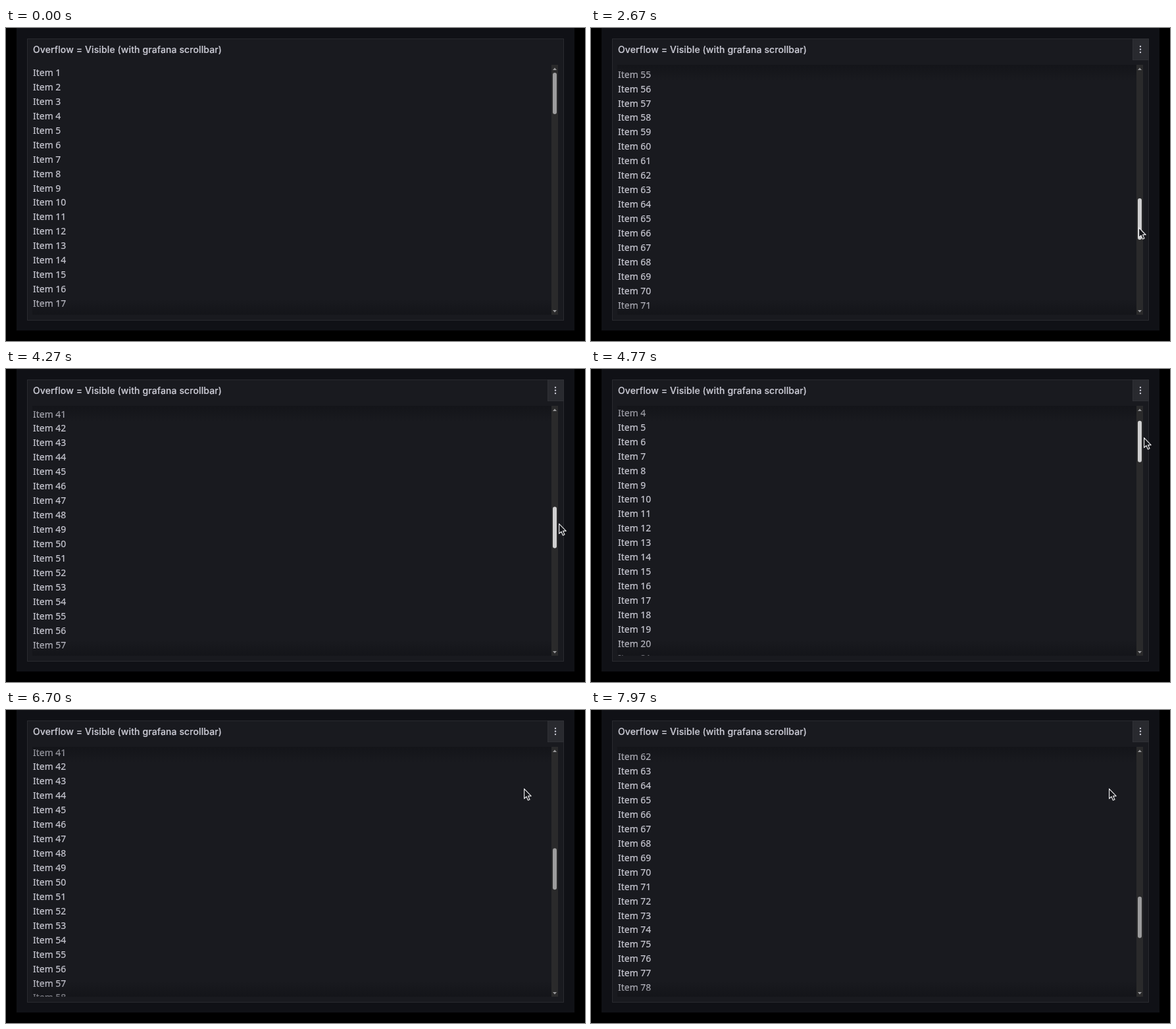
An HTML page that plays this animation: 880x476 px, repeating every 8000 ms.

```html
<!DOCTYPE html>
<html lang="en">
<head>
<meta charset="utf-8">
<title>Scrolling panel</title>
<style>
html, body { margin: 0; width: 100%; height: 100%; overflow: hidden; background: #000; }
#stage { position: relative; width: 880px; height: 476px; overflow: hidden; }
#stage div, #stage svg { position: absolute; box-sizing: border-box; }
#page { left: 16px; top: 0; width: 848px; height: 460px; background: #101116; }
#panel { left: 32px; top: 16px; width: 816px; height: 429px; background: #191a1f; border: 1px solid #292a2f; }
#title, #list { color: #c9c9d3; white-space: nowrap; -webkit-text-stroke: .2px #c9c9d3; }
#title { left: 41px; top: 21.5px; font: 500 13.96px/22px Inter, sans-serif; letter-spacing: .13px; }
#menu { left: 823px; top: 16px; width: 25px; height: 33px; background: #292a2f; border: 1px solid #2f3035; }
#view { left: 40px; top: 56px; width: 790px; height: 380px; overflow: hidden; }
#list { left: 1px; top: 1px; font: 13.96px/21.94px "Noto Sans", sans-serif; }
#list p { margin: 0; height: 21.94px; }
.shade { left: 0; width: 100%; height: 24px; }
#above { top: 0; background: linear-gradient(#0d0e1270, #0d0e1200); }
#below { bottom: 0; background: linear-gradient(#0d0e1200, #0d0e1270); }
#track { left: 829px; top: 56px; width: 10px; height: 380px; background: #2a2a2b; }
#thumb { left: 831px; top: 67.5px; width: 6px; height: 63px; border-radius: 3px; }
#deco, #cursor { left: 0; top: 0; overflow: visible; }
</style>
</head>
<body>
<div id="stage">
  <div id="page"></div>
  <div id="panel"></div>
  <div id="title">Overflow = Visible (with grafana scrollbar)</div>
  <div id="menu"></div>
  <div id="view">
    <div id="list"></div>
    <div id="above" class="shade"></div>
    <div id="below" class="shade"></div>
  </div>
  <div id="track"></div>
  <div id="thumb"></div>
  <svg id="deco" width="880" height="476">
    <path d="M831 64l3-3.5 3 3.5zM831 429l3 3.5 3-3.5z" fill="#98989a"/>
    <g id="dots" fill="#c9c9d3">
      <circle cx="835" cy="28" r="1.2"/><circle cx="835" cy="32.5" r="1.2"/><circle cx="835" cy="37" r="1.2"/>
    </g>
  </svg>
  <svg id="cursor" width="14" height="20">
    <path d="M.6 .8V15.8L4 12.7L6.4 18.3L9 17.2L6.6 11.8H11.2Z" fill="#15161a" stroke="#e4e4e6" stroke-width="1.2" stroke-linejoin="round"/>
  </svg>
</div>
<script>
const LOOP = 8000, MAX = 1814, THUMB_RATIO = 6.19;
// when each action begins, in ms
const ENTER = 830, DRAG_DOWN = 1640, REGRIP = 3000, DRAG_UP = 3587, RELEASE = 5400, WHEEL = 5930;

const $ = id => document.getElementById(id);
const clamp = v => Math.min(1, Math.max(0, v));
const part = (t, from, length) => clamp((t - from) / length);
const smooth = p => p * p * (3 - 2 * p);
const mix = (a, b, p) => a + (b - a) * p;

for (let n = 1; n <= 100; n++) {
  const row = document.createElement("p");
  row.textContent = "Item " + n;
  $("list").append(row);
}

function scrollAt(t) {
  if (t < DRAG_UP) return MAX * part(t, DRAG_DOWN, 1225) ** 2.486;
  if (t < WHEEL) return MAX * (1 - smooth(part(t, DRAG_UP, 1338)));
  return 1335 * (1 - (1 - part(t, WHEEL, 2040)) ** 2.27);
}

function pointerAt(t, thumb) {
  if (t < DRAG_DOWN) {
    const p = smooth(part(t, ENTER, 800));
    return [mix(88, 832, p), mix(449, 107, p)];
  }
  if (t < REGRIP) return [832, 107 + thumb * 1.025];
  if (t < DRAG_UP) {
    const p = smooth(part(t, REGRIP, 400));
    return [mix(832, 840, p), mix(407, 93 + thumb, p)];
  }
  if (t < RELEASE) return [840, 93 + thumb];
  const p = smooth(part(t, RELEASE, 300));
  return [mix(840, 787, p), mix(93, 119, p) + 65 * Math.sin(Math.PI * p)];
}

function draw(t) {
  const scroll = scrollAt(t), thumb = scroll / THUMB_RATIO;
  const [x, y] = pointerAt(t, thumb);
  $("list").style.transform = `translateY(${-scroll}px)`;
  $("thumb").style.transform = `translateY(${thumb}px)`;
  $("thumb").style.background = t >= DRAG_DOWN - 40 && t < RELEASE ? "#cfcfd0" : "#9c9c9d";
  $("above").style.opacity = clamp(scroll / 40);
  $("below").style.opacity = clamp((MAX - scroll) / 40);

  const shown = t >= ENTER ? "visible" : "hidden";
  for (const id of ["menu", "dots", "cursor"]) $(id).style.visibility = shown;
  $("cursor").style.transform = `translate(${x}px, ${y}px)`;
}

const start = performance.now();
function tick() {
  draw((performance.now() - start) % LOOP);
  requestAnimationFrame(tick);
}
draw(0);
requestAnimationFrame(tick);
</script>
</body>
</html>
```
